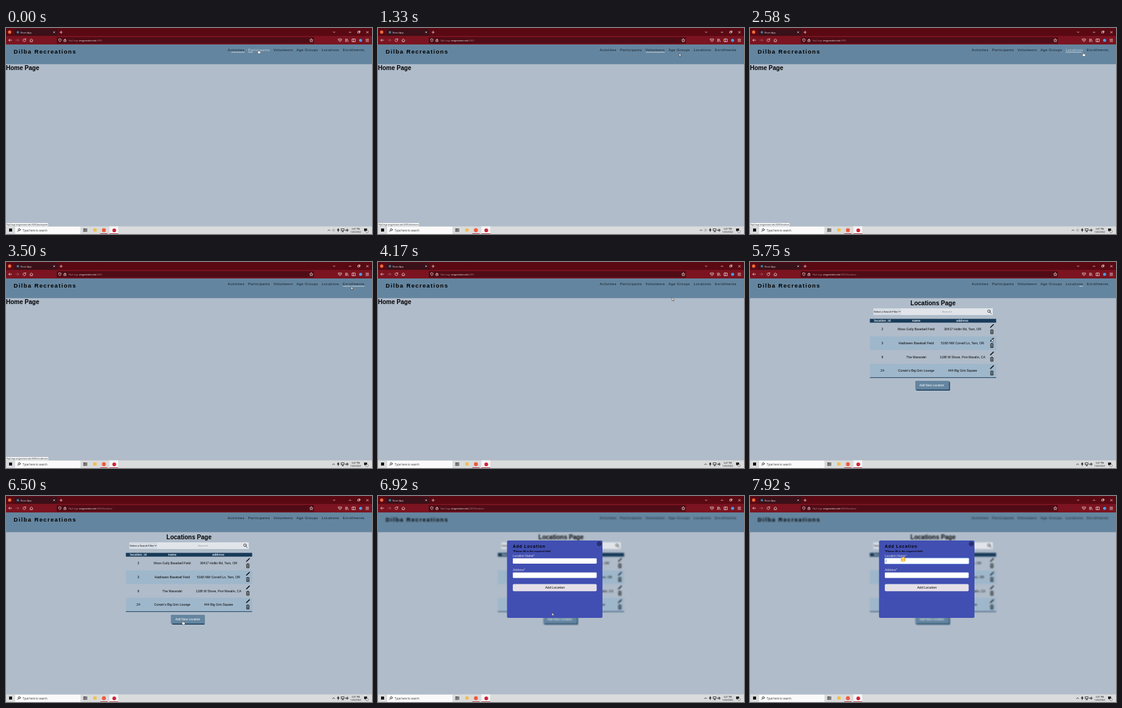
Write an HTML page that moves like this. It is 600 px wide and 338 px high and loops after 8000 ms.

```html
<!DOCTYPE html>
<html lang="en">
<head>
<meta charset="utf-8">
<title>Recreation admin</title>
<style>
html, body { margin: 0; width: 100%; height: 100%; overflow: hidden; background: #b0bcca; }
svg { display: block; width: 600px; height: 338px; font-family: "Liberation Sans", Arial, sans-serif; }
text { white-space: pre; }
.ui { font-family: "Open Sans", "Noto Sans", sans-serif; }
.b { font-weight: bold; }
.mid { text-anchor: middle; }
.line { fill: none; stroke-width: .8; stroke-linecap: round; stroke-linejoin: round; }
.light { stroke: #e9d5d8; }
.dark { stroke: #1b1b1b; }
.nav { font-size: 5.6px; letter-spacing: .55px; }
.cell { font-size: 5.25px; }
.blurred { filter: blur(.9px); }
</style>
</head>
<body>
<svg viewBox="0 0 600 338">
  <defs>
    <g id="edit">
      <path d="M-3.2 3.2l.7-1.9 4.9-4.7 1.1 1.1-4.9 4.8z" fill="#101418"/>
      <path d="M-2.6 7h5.2M-1 6.6v-.8h2v.8M-2.1 8v4.8h4.2V8M-.7 8.6v3.4M.7 8.6v3.4" class="line dark"/>
    </g>
  </defs>

  <!-- page -->
  <rect y="27" width="600" height="299" fill="#b0bcca"/>
  <rect y="27" width="600" height="32.3" fill="#64859f"/>
  <g id="page">
    <text x="12.5" y="42" class="b" font-size="9.6" letter-spacing="1.3">Dilba Recreations</text>
    <g id="nav"></g>
    <text id="home" x="0" y="69" class="b" font-size="10">Home Page</text>
    <g id="locations">
      <text x="300" y="70.5" class="b mid" font-size="10">Locations Page</text>
      <rect x="202.500" y="76" width="195.500" height="11" fill="#e1e5ea"/>
      <rect x="202.500" y="76" width="45.500" height="11" fill="#d6dce4"/>
      <text x="203" y="83.200" font-size="4.130">Select a Search Filter</text>
      <path d="M244 80.900l1.200 1.200 1.200-1.200" class="line dark"/>
      <text x="315" y="83.200" font-size="4.200" letter-spacing=".5" fill="#777d85">Search</text>
      <path d="M393.300 82.400l2.300 2.300" class="line dark" stroke-width="1.100"/>
      <circle cx="391.700" cy="80.700" r="2.100" class="line dark"/>
      <g id="empty"></g>
      <g id="table"></g>
      <g id="add">
        <rect id="shade" width="55.500" height="14.500" rx=".8" fill="#173a59"/>
        <rect id="face" width="55.500" height="14.500" rx=".8" fill="#64859f"/>
        <text id="addText" class="mid" font-size="5" fill="#fff">Add New Location</text>
      </g>
    </g>
  </g>

  <g id="modal">
    <rect x="211.500" y="73" width="156.500" height="127" rx="2.500" fill="#414fb2"/>
    <circle cx="362.500" cy="78.500" r="3" class="line" stroke="#000"/>
    <path d="M361.300 77.300l2.400 2.400m0-2.400l-2.400 2.400" class="line" stroke="#000"/>
    <text x="221" y="85" class="b" font-size="6.700" letter-spacing=".93">Add Location</text>
    <text x="221" y="92.300" class="b" font-size="4.260">*Please fill in the required field</text>
    <text x="221" y="99.900" font-size="5" fill="#d5d6e6">Location Name*</text>
    <rect id="ring" x="220.300" y="101.400" width="139" height="10.300" rx="1.800" fill="#8ec0f5"/>
    <rect x="221" y="102.200" width="137.500" height="8.800" rx="1.300" fill="#fff"/>
    <path id="caret" d="M223 104.200v5" stroke="#222" stroke-width=".5"/>
    <text x="221" y="123.200" font-size="5" fill="#d5d6e6">Address*</text>
    <rect x="221" y="125.500" width="137.500" height="8.900" rx="1.300" fill="#fff"/>
    <rect x="221" y="144.600" width="137.500" height="11.600" rx="2" fill="#e5e0e7"/>
    <text x="290" y="152.300" class="mid" font-size="5.500">Add Location</text>
  </g>

  <!-- browser -->
  <rect width="600" height="13.500" fill="#5a0913"/>
  <rect y="13" width="600" height="14" fill="#7b1420"/>
  <rect x="14" y="1.500" width="70" height="11" rx="1" fill="#3a1119"/>
  <rect x="83" y="15" width="422" height="10.500" rx="1.500" fill="#500c16"/>
  <circle cx="6" cy="6.700" r="2.700" fill="#f0693a"/>
  <circle cx="19.500" cy="7" r="2" fill="#3f7fa5"/>
  <text x="24" y="8.500" class="ui" font-size="3.800" fill="#ecdfe1">React App</text>
  <path class="line light" d="M77.900 5.900l2 2m0-2l-2 2M88.300 7h4M90.300 5v4M536.500 6.200l1.500 1.500 1.500-1.500M562.500 7h3M591 5.500l3 3m0-3l-3 3M577 5.700h2.500v2.500h-2.500zM578 5.700v-.8h2.400v2.400h-.8"/>
  <path class="line light" d="M9.500 20h-5m2-2l-2 2 2 2M39 20.200l2.500-2.300 2.500 2.300M39.800 20v2.500h3.400V20M32 18.700a2.300 2.300 0 1 0 .4 1.700M32.300 17.500v1.500h-1.500"/>
  <path class="line" stroke="#a0616a" d="M16 20h5m-2-2l2 2-2 2"/>
  <path class="line light" d="M88.300 17.700l2 .8q0 3-2 4.200q-2-1.200-2-4.200zM95.300 19.700h3v2.500h-3zM95.900 19.500v-.8q.9-1.400 1.800 0v.8"/>
  <path class="line light" d="M500.500 17.500l.8 1.700 1.900.3-1.300 1.300.3 1.900-1.700-.9-1.700.9.3-1.900-1.300-1.300 1.900-.3zM545 18h5v2q-2.500 4.500-5 0zM546.500 19.600l1 1 1-1M556.800 18v4.500M558.200 18v4.500M559.500 18.300l1.500 4.200M567.600 18h5v4.500h-5zM569.600 18v4.500M590 18.300h4.500M590 20.200h4.500M590 22.100h4.500"/>
  <circle cx="581.300" cy="20.200" r="2.500" fill="#4a9ee0"/>
  <text x="102.500" y="21.700" class="ui" font-size="3.700" fill="#bd8990">flip2.engr.<tspan fill="#fff">oregonstate.edu</tspan>:9205<tspan id="path"></tspan></text>

  <g id="status">
    <rect id="statusBox" x="-.5" y="319.500" height="6.300" fill="#f2f3f5" stroke="#9298a0" stroke-width=".4"/>
    <text id="statusText" x="1" y="323.900" class="ui" font-size="3.250" fill="#222"></text>
  </g>

  <!-- taskbar -->
  <rect y="325.500" width="600" height="12.500" fill="#dadbdc"/>
  <rect x="5" y="329" width="5" height="5" fill="#161616"/>
  <rect x="15" y="326" width="107" height="12" fill="#fafafa"/>
  <circle cx="21.700" cy="331" r="1.700" class="line dark"/>
  <path d="M20.500 332.300l-1.600 1.700" class="line dark"/>
  <text x="27.500" y="333.500" class="ui" font-size="4.400" fill="#333">Type here to search</text>
  <path d="M127.500 329.500h3.500v1.300h-3.500zM127.500 332.300h3.500v1.600h-3.500zM132.500 329.300v4.700" class="line dark"/>
  <rect x="143" y="329" width="5.500" height="5" fill="#f0c04a"/>
  <circle cx="160.500" cy="331.700" r="3.200" fill="#ef5a3c"/>
  <rect x="169.500" y="325.500" width="14.500" height="12.500" fill="#f5f5f6"/>
  <circle cx="177.500" cy="332" r="3.100" fill="#cf2439"/>
  <path d="M154.500 337.500h12M169.500 337.500h14.500" stroke="#b03a48"/>
  <path id="more" d="M-1.700 .9l1.700-1.700 1.700 1.700" class="line dark"/>
  <g id="extra">
    <circle cx="537" cy="331.700" r="2.200" fill="#eee" stroke="#888" stroke-width=".5"/>
    <circle cx="537" cy="331.700" r=".9" fill="#666"/>
  </g>
  <rect x="543.600" y="329" width="2" height="3.400" rx="1" fill="#111"/>
  <path d="M542.900 331.500q1.700 3 3.400 0M544.600 333v1.300M549.800 329.500h4.500v3h-4.500zM552 332.700v1.500M551 334.300h2.200M557.300 331h1l1.300-1.200v3.900l-1.300-1.200h-1zM560.700 330.600q.8 1.200 0 2.300" class="line dark"/>
  <g class="ui mid" font-size="3.700" fill="#111">
    <text x="573.300" y="330.500">3:47 PM</text>
    <text x="573.300" y="336.300">12/6/2022</text>
  </g>
  <path d="M587 329h5v4h-2.500l-1.300 1.300V333H587z" fill="#222"/>
  <circle cx="592" cy="334" r="1.900" fill="#f0f0f0" stroke="#333" stroke-width=".5"/>

  <g id="cursor">
    <path id="arrow" d="M0 0v5.200l1.200-1.100.9 2 .9-.4-.9-1.900h1.700z" fill="#fff" stroke="#222" stroke-width=".5"/>
    <path id="hand" d="M-.2.100q.7-.7 1.100.2v2.200l2.400.5q.7.300.6 1.100l-.5 2.400H.300L-1.700 4q0-.8.7-.6l.7.500z" fill="#fff" stroke="#222" stroke-width=".4"/>
    <g id="beam">
      <circle r="3.900" fill="#f2b632" opacity=".9"/>
      <path d="M-1-2.500h2M0-2.500v5M-1 2.500h2" class="line" stroke="#fff6d8"/>
    </g>
  </g>
</svg>
<script>
const LOOP = 8000, STEP = 1000 / 12;
const PAGE_AT = 5080, DATA_AT = 5250, MODAL_AT = 6750, FOCUS_AT = 7750;
const $ = id => document.getElementById(id);
const show = (id, on) => $(id).style.display = on ? '' : 'none';
const clamp = v => Math.max(0, Math.min(1, v));
const smooth = v => (v = clamp(v), v * v * (3 - 2 * v));

function add(parent, tag, attrs, text = '') {
  const el = document.createElementNS('http://www.w3.org/2000/svg', tag);
  for (const k in attrs) el.setAttribute(k, attrs[k]);
  el.textContent = text;
  parent.append(el);
  return el;
}

// label, route, x, width, hover spans [enter, leave]
const links = [
  ['Activities', 'activities', 363.5, 27.5, [[-900, -150]]],
  ['Participants', 'participants', 397, 35.5, [[-150, 740]]],
  ['Volunteers', 'volunteers', 438.5, 32, [[830, 1290]]],
  ['Age Groups', 'agegroups', 476.3, 35, [[1400, 2120]]],
  ['Locations', 'locations', 517.5, 28.7, [[2160, 2800], [4570, 5400]]],
  ['Enrollments', 'enrollments', 552.3, 35.5, [[2900, 3480]]]
].map(([label, route, x, w, spans]) => ({
  route, x, w, spans,
  text: add($('nav'), 'text', { x, y: 38, class: 'nav' }, label),
  bar: add($('nav'), 'rect', { y: 39.4, height: .8, fill: '#dde4ea' })
}));

function drawRows(group, top, left, right, iconX, rows) {
  rows.forEach((row, i) => {
    const y = top + i * 22.55;
    if (i % 2) add(group, 'rect', { x: left, y, width: right - left, height: 22.55, fill: '#9fb7cb' });
    row.forEach((s, c) => add(group, 'text',
      { x: [217, 272.5, 348.5][c], y: y + 13, class: 'cell mid' }, s));
    add(group, 'use', { href: '#edit', transform: `translate(${iconX} ${y + 5.7})` });
  });
  add(group, 'rect', { x: left, y: top + 89.8, width: right - left, height: 1, fill: '#173a59' });
}

const places = [
  ['2', 'Moss Gully Baseball Field', '30417 Hollin Rd, Tarn, OR'],
  ['3', 'Hadlowen Baseball Field', '5160 NW Corvell Ln, Tarn, OR'],
  ['8', 'The Marandel', '1188 W Shore, Port Maralin, CA'],
  ['24', "Corwin's Big Grin Lounge", '444 Big Grin Square']
];
drawRows($('empty'), 93.4, 268.5, 331, 300, places.map(() => []));
add($('table'), 'rect', { x: 196.5, y: 93.3, width: 207, height: 6.2, fill: '#173a59' });
['location_id', 'name', 'address'].forEach((s, c) => add($('table'), 'text',
  { x: [217, 272.5, 348][c], y: 98.1, class: 'b mid', 'font-size': 5.2, fill: '#dfe7ee' }, s));
drawRows($('table'), 99.4, 196.5, 403.5, 396.5, places);

// pointer tip: time, x, y
const track = [
  [0, 413.5, 35.5], [500, 415, 36], [800, 437, 37], [1250, 467, 39], [1330, 493.7, 41.5],
  [1700, 497, 37], [2080, 510, 38], [2250, 530, 38], [2580, 546, 40], [2830, 549, 39],
  [3250, 571, 36.5], [3420, 571, 38], [3750, 535, 53], [4170, 482, 58.3], [4350, 487, 57],
  [4670, 523, 40], [5000, 524.7, 37.5], [5200, 524.7, 37.5], [5830, 390, 130],
  [6330, 291, 203], [6500, 289.5, 204.5], [6750, 289.5, 204.5], [7420, 262, 120],
  [7700, 251, 104.2], [8000, 251, 104.2]
];
function pointer(t) {
  const i = Math.max(1, track.findIndex(k => k[0] > t));
  const [a, b] = [track[i - 1], track[i]];
  const p = smooth((t - a[0]) / (b[0] - a[0]));
  return [a[1] + (b[1] - a[1]) * p, a[2] + (b[2] - a[2]) * p];
}

function drawLinks(t) {
  let over = false, route = '';
  for (const l of links) {
    const span = l.spans.filter(s => s[0] <= t).pop();
    let from = 0, to = 0, hot = false;
    if (span) {
      hot = t < span[1];
      to = smooth((Math.min(t, span[1]) - span[0]) / 500);
      from = hot ? 0 : to * smooth((t - span[1]) / 500);
      if (t < span[1] + 130 && (hot || !route)) route = l.route;
    }
    over = over || hot;
    l.text.setAttribute('fill', hot ? '#ccd8e2' : '#111a22');
    l.bar.setAttribute('x', l.x + l.w * from);
    l.bar.setAttribute('width', Math.max(0, l.w * (to - from)));
  }
  show('status', route);
  if (route) {
    $('statusText').textContent = 'flip2.engr.oregonstate.edu:9205/' + route;
    $('statusBox').setAttribute('width', $('statusText').getComputedTextLength() + 2.5);
  }
  return over;
}

function drawButton(t) {
  const hot = t >= 6300 && t < MODAL_AT;
  const x = hot ? 270.3 : 271, y = t >= DATA_AT ? 195 : 189;
  const place = (id, px, py) => { $(id).setAttribute('x', px); $(id).setAttribute('y', py); };
  place('face', x, y);
  place('shade', x + (hot ? 2 : 1.3), y + (hot ? 1.5 : 1.4));
  $('shade').setAttribute('width', hot ? 53.2 : 55.5);
  place('addText', 298, y + 9);
  return hot;
}

function draw(t) {
  const paged = t >= PAGE_AT, full = t >= DATA_AT, modal = t >= MODAL_AT, focus = t >= FOCUS_AT;
  show('home', !paged);
  show('locations', paged);
  show('empty', !full);
  show('table', full);
  show('modal', modal);
  show('ring', focus);
  show('caret', focus);
  $('page').setAttribute('class', modal ? 'blurred' : '');
  $('path').textContent = paged ? '/locations' : '';
  const extra = t < 2830;
  show('extra', extra);
  $('more').setAttribute('transform', `translate(${extra ? 529.5 : 537} 331.7)`);

  const overLink = drawLinks(t), overButton = drawButton(t);
  const hand = overLink || overButton;
  show('hand', hand);
  show('beam', focus);
  show('arrow', !hand && !focus);
  $('cursor').setAttribute('transform', `translate(${pointer(t).join(' ')})`);
}

function tick(now) {
  const t = now % LOOP;
  draw(Math.floor((t + 4) / STEP) * STEP % LOOP);
  requestAnimationFrame(tick);
}
draw(0);
requestAnimationFrame(tick);
</script>
</body>
</html>
```
